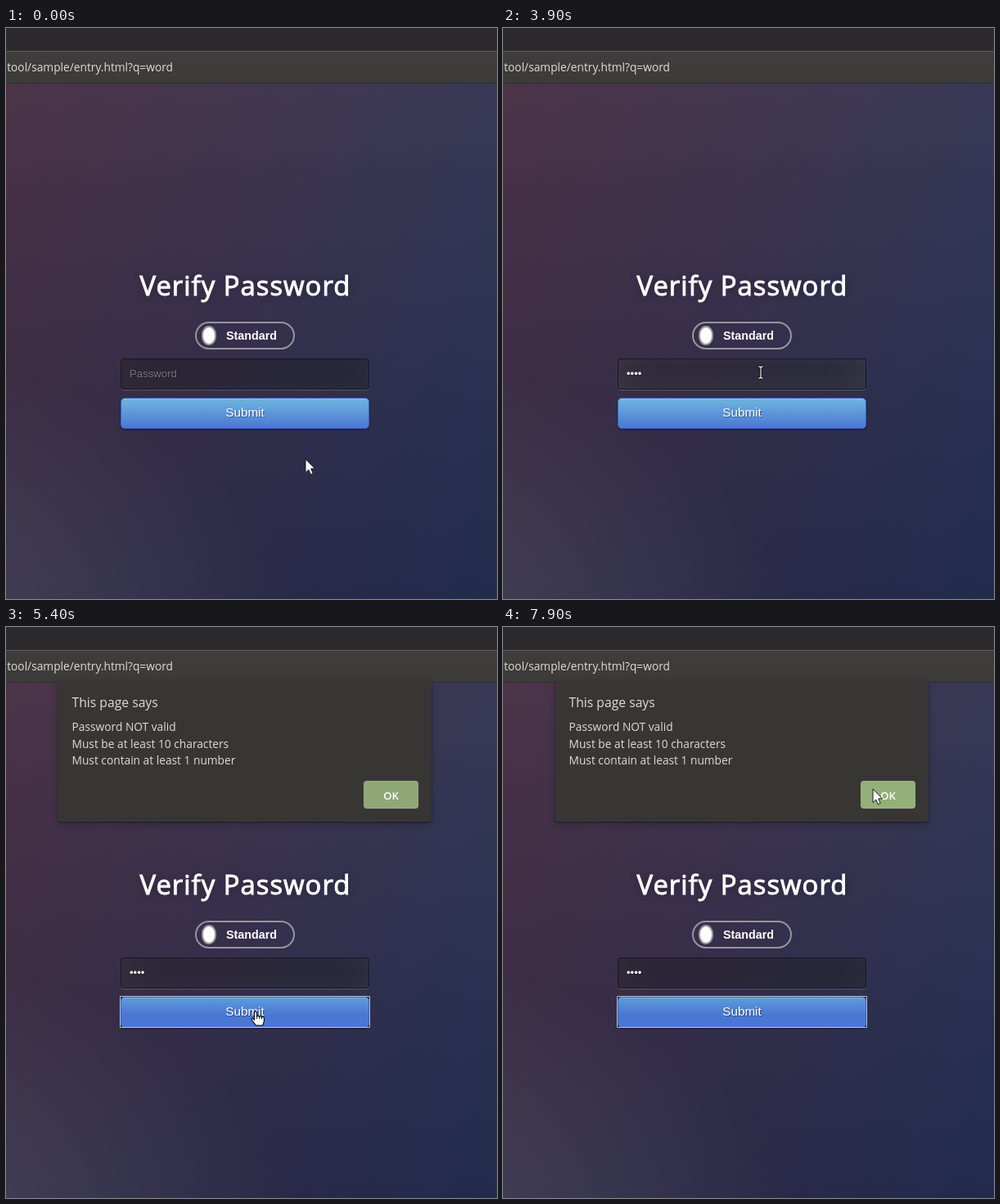
Write an HTML page that moves like this. It is 600x698 px and loops after 8 s.

```html
<!DOCTYPE html>
<html lang="en">
<head>
<meta charset="utf-8">
<title>Verify Password</title>
<style>
html, body { margin: 0; width: 100%; height: 100%; overflow: hidden; background: #2c2a2c; }
#stage { position: relative; width: 600px; height: 698px; overflow: hidden; }
#stage * { position: absolute; box-sizing: border-box; white-space: nowrap; }
#page {
  left: -300px; top: 68px; width: 1184px; height: 704px;
  background:
    linear-gradient(rgba(35,0,30,.09), rgba(35,0,30,.09)),
    radial-gradient(ellipse at 0% 100%, rgba(104,128,138,.4) 10%, rgba(138,114,76,0) 40%),
    linear-gradient(to bottom, rgba(57,173,219,.25), rgba(42,60,87,.4)),
    linear-gradient(135deg, #670d10, #092756);
}
#bar {
  left: 0; top: 28px; width: 600px; height: 40px;
  background: linear-gradient(#3e3d3b, #3c3b39);
  border-top: 1px solid #5b5a58; border-bottom: 1px solid #302f2f;
}
.ui { font-family: "Open Sans", "Noto Sans", sans-serif; font-size: 13.75px; line-height: 20px; color: #dddcd8; }
.form { font-family: "Liberation Sans", Arial, sans-serif; }
#url { right: 396px; top: 38px; }
h1 {
  margin: 0; left: 163.5px; top: 291px;
  font: 400 32.8px/48px "Open Sans", sans-serif; letter-spacing: 1.017px;
  color: #fff; -webkit-text-stroke: 1px #fff; text-shadow: 0 0 10px rgba(0,0,0,.3);
}
#toggle { left: 231px; top: 359px; width: 122px; height: 34px; border: 2px solid #98959b; border-radius: 17px; }
#knob { left: 239px; top: 364px; width: 18px; height: 24px; border: 2px solid #9a979c; border-radius: 9px / 11px; background: #fff; }
#mode { left: 269px; top: 366px; font-size: 14.3px; line-height: 20px; font-weight: 700; color: #fff; }
#field {
  left: 140px; top: 404px; width: 304px; height: 38px; padding-left: 10px;
  background: rgba(0,0,0,.3); border: 1px solid rgba(0,0,0,.3); border-radius: 4px;
  font-size: 13.2px; line-height: 36px; text-shadow: 1px 1px 1px rgba(0,0,0,.3);
}
#submit {
  left: 140px; top: 452px; width: 304px; height: 38px;
  background: #4a77d4 linear-gradient(#6eb6de, #4a77d4) repeat-x;
  border: 1px solid #3762bc; border-radius: 5px;
  box-shadow: inset 0 1px 0 rgba(255,255,255,.2), 0 1px 2px rgba(0,0,0,.5);
  color: #fff; font-size: 15.25px; line-height: 34px; text-align: center;
  text-shadow: 1px 1px 1px rgba(0,0,0,.4);
}
#ring { left: 139px; top: 451px; width: 306px; height: 39px; border: 1px solid rgba(226,228,238,.8); border-radius: 1px; }
#alert {
  left: 64px; top: 67px; width: 456px; height: 171px;
  background: #373634; border-radius: 0 0 3px 3px;
  box-shadow: 0 1px 2px rgba(0,0,0,.4), 0 2px 8px rgba(0,0,0,.25);
}
#alert .head { left: 16.5px; top: 14px; font-size: 15.7px; line-height: 22px; }
#alert .line { left: 16.5px; }
#ok {
  left: 373px; top: 121px; width: 67px; height: 34px; border: 1px dotted #a2b58f; border-radius: 4px;
  color: #fff; font-size: 13px; font-weight: 600; line-height: 34px; text-align: center;
}
svg { left: 0; top: 0; overflow: visible; }
</style>
</head>
<body>
<div id="stage">
  <div id="page"></div>
  <div id="bar"></div>
  <div id="url" class="ui">tool/sample/entry.html?q=word</div>
  <h1>Verify Password</h1>
  <div id="toggle"></div>
  <div id="knob"></div>
  <div id="mode" class="form">Standard</div>
  <div id="field" class="form"></div>
  <div id="submit" class="form">Submit</div>
  <div id="ring"></div>
  <div id="alert" class="ui">
    <div class="head">This page says</div>
    <div class="line" style="top:45px">Password NOT valid</div>
    <div class="line" style="top:65.5px">Must be at least 10 characters</div>
    <div class="line" style="top:86px">Must contain at least 1 number</div>
    <div id="ok">OK</div>
  </div>
  <svg id="cursor" width="1" height="1" stroke-linejoin="round">
    <path id="arrow" d="M0 0V16.5L3.8 13L6.4 18.8L9.2 17.5L6.7 11.8H11.6Z" fill="#fff" stroke="#19191e"/>
    <g id="beam" fill="none" stroke-linecap="square">
      <path d="M-2.5 -7H-1L0 -6L1 -7H2.5M0 -6V6M-2.5 7H-1L0 6L1 7H2.5" stroke="#111" stroke-width="3"/>
      <path d="M-2.5 -7H-1L0 -6L1 -7H2.5M0 -6V6M-2.5 7H-1L0 6L1 7H2.5" stroke="#fff" stroke-width="1.1"/>
    </g>
    <g id="hand" stroke="#111" stroke-width="1.2">
      <path d="M-1.6 10.5V1.2Q-1.4 -.2 0 -.2T1.6 1.2V6Q3.2 4.7 4.6 6.2Q6.2 5.1 7.5 6.8Q10.3 6 10.4 8.6V12L8.6 17.2H.6L-4.5 10.8Q-5.3 8.6 -3.6 8.3Q-2.6 8.5 -1.6 10.5Z" fill="#fff"/>
      <path d="M1.6 6V9M4.6 6.3V9M7.5 7V9.3" fill="none" stroke-width="1"/>
    </g>
  </svg>
</div>
<script>
const $ = id => document.getElementById(id);
const LOOP = 8000, STEP = 100;
const typed = [2700, 2800, 3200, 3400];

// time, x, y of the pointer's hot spot
const path = [
  [600, 366, 527], [800, 342, 476], [1000, 315, 421],
  [4200, 315, 421], [4500, 309, 453], [4700, 305, 470],
  [6700, 305, 470], [6800, 382, 296], [7000, 442, 218],
  [7100, 442, 218], [7300, 450, 202], [7700, 450, 202], [7800, 452, 198]
];

const ramp = (t, from, to) => Math.min(1, Math.max(0, (t - from) / (to - from)));
const show = (id, on) => { $(id).style.display = on ? "" : "none"; };

function pointer(t) {
  const i = path.findIndex(p => p[0] > t);
  if (i === 0) return path[0].slice(1);
  if (i < 0) return path[path.length - 1].slice(1);
  const [a, b] = [path[i - 1], path[i]];
  const k = ramp(t, a[0], b[0]);
  return [a[1] + (b[1] - a[1]) * k, a[2] + (b[2] - a[2]) * k];
}

function cursorKind(t, y) {
  if (t >= 6900) return "arrow";
  if (t >= 6800) return "hand";
  if (y >= 404 && y < 442) return "beam";
  return y >= 452 && y < 490 ? "hand" : "arrow";
}

function draw(t) {
  const [x, y] = pointer(t);
  const kind = cursorKind(t, y);
  ["arrow", "beam", "hand"].forEach(id => show(id, id === kind));
  $("cursor").style.transform = `translate(${x}px, ${y}px)`;

  const count = typed.filter(at => t >= at).length;
  const field = $("field");
  field.textContent = count ? "•".repeat(count) : "Password";
  field.style.color = count ? "#fff" : "#757575";
  const glow = .2 + .2 * (ramp(t, 1600, 2100) - ramp(t, 5100, 5600));
  field.style.boxShadow =
    `inset 0 -5px 45px rgba(100,100,100,${glow}), 0 1px 1px rgba(255,255,255,.2)`;

  $("submit").style.backgroundPositionY = -15 * ramp(t, 4400, 4600) + "px";
  show("ring", t >= 5200);
  show("alert", t >= 5300);
  $("ok").style.backgroundColor = t >= 7000 ? "#93b07a" : "#8fa876";
}

function tick(now) {
  draw(Math.floor((now % LOOP) / STEP) * STEP);
  requestAnimationFrame(tick);
}
draw(0);
requestAnimationFrame(tick);
</script>
</body>
</html>
```
